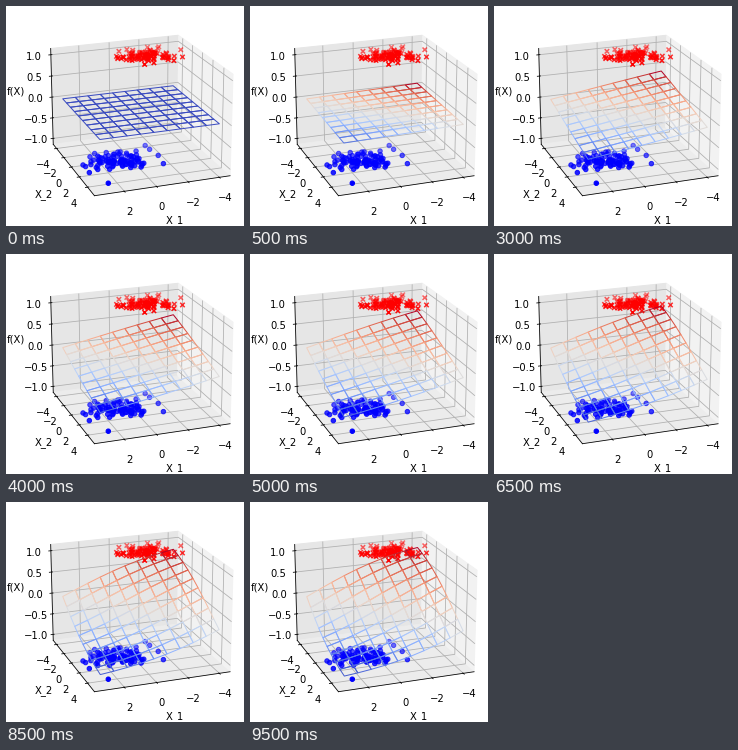
Recreate the animation shown at these times as a matplotlib script. Size 238x220 px, loop 10000 ms.

```python
import numpy as np
import matplotlib.pyplot as plt
from matplotlib.animation import FuncAnimation
from matplotlib.colors import to_rgba

WIDTH, HEIGHT, DPI = 238, 220, 72
FRAMES, INTERVAL = 20, 500
ELEV, AZIM = 20, 70
X_RANGE, Y_RANGE = (-4.16, 3.28), (-4.27, 4.93)
FINAL_WEIGHTS, FINAL_BIAS = (-0.166, -0.157), -0.17

plt.rcParams.update({"font.family": "DejaVu Sans", "font.size": 10})
rng = np.random.default_rng(4)


def padded(low, high):
    """Limits with a 5 % margin and the extra rim of the panes."""
    middle, half = (low + high) / 2, (high - low) / 2 * 1.1 * 25 / 24
    return middle - half, middle + half


def scatter_class(center, spread, level, color, marker, count=98):
    """Normal cloud inside the data range, fading with distance."""
    x, y = np.clip(rng.standard_normal((count, 2)), -2.4, 2.4).T
    x, y = center[0] + spread[0] * x, center[1] + spread[1] * y
    # Each class reaches the range limit on its own side.
    side = 0 if level > 0 else 1
    x[np.argmax(-level * x)] = X_RANGE[side]
    y[np.argmax(-level * y)] = Y_RANGE[side]
    angle = np.radians(AZIM)
    nearness = x * np.cos(angle) + y * np.sin(angle)
    alpha = np.interp(nearness, [nearness.min(), nearness.max()], [0.5, 1])
    colors = [to_rgba(color, a) for a in alpha]
    ax.scatter(x, y, level, c=colors, marker=marker, depthshade=False)


fig = plt.figure(figsize=(WIDTH / DPI, HEIGHT / DPI), dpi=DPI, facecolor="white")
size = 217.44
ax = fig.add_axes([21.1 / WIDTH, 3.4 / HEIGHT, size / WIDTH, size / HEIGHT],
                  projection="3d")
ax.view_init(elev=ELEV, azim=AZIM)
ax.set(xlim=padded(*X_RANGE), ylim=padded(*Y_RANGE), zlim=padded(-1, 1),
       xticks=range(-4, 3, 2), yticks=range(-4, 5, 2),
       zticks=np.linspace(-1, 1, 5),
       xlabel="X_1", ylabel="X_2", zlabel="f(X)")
for axis, shade in ((ax.xaxis, 0.95), (ax.yaxis, 0.90), (ax.zaxis, 0.925)):
    axis.set_pane_color((shade, shade, shade, 1))

scatter_class((-1.65, -2.35), (0.85, 0.9), 1, "r", "x")
scatter_class((0.95, 1.25), (1.0, 0.95), -1, "b", "o")
scatters = list(ax.collections)

grid_x, grid_y = np.meshgrid(np.linspace(*X_RANGE, 10), np.linspace(*Y_RANGE, 10))


def draw(frame):
    for artist in list(ax.collections):
        if artist not in scatters:
            artist.remove()
    growth = frame / (FRAMES - 1)
    w1, w2 = FINAL_WEIGHTS
    z = np.tanh(growth * (w1 * grid_x + w2 * grid_y + FINAL_BIAS))
    colors = plt.cm.coolwarm(plt.Normalize(z.min(), z.max())(z))
    surface = ax.plot_surface(grid_x, grid_y, z, rstride=1, cstride=1,
                              facecolors=colors, shade=False, linewidth=1)
    surface.set_facecolor((0, 0, 0, 0))
    return [surface]


anim = FuncAnimation(fig, draw, frames=FRAMES, interval=INTERVAL,
                     init_func=lambda: draw(0), repeat=True, repeat_delay=0,
                     blit=False)
plt.show()
```
